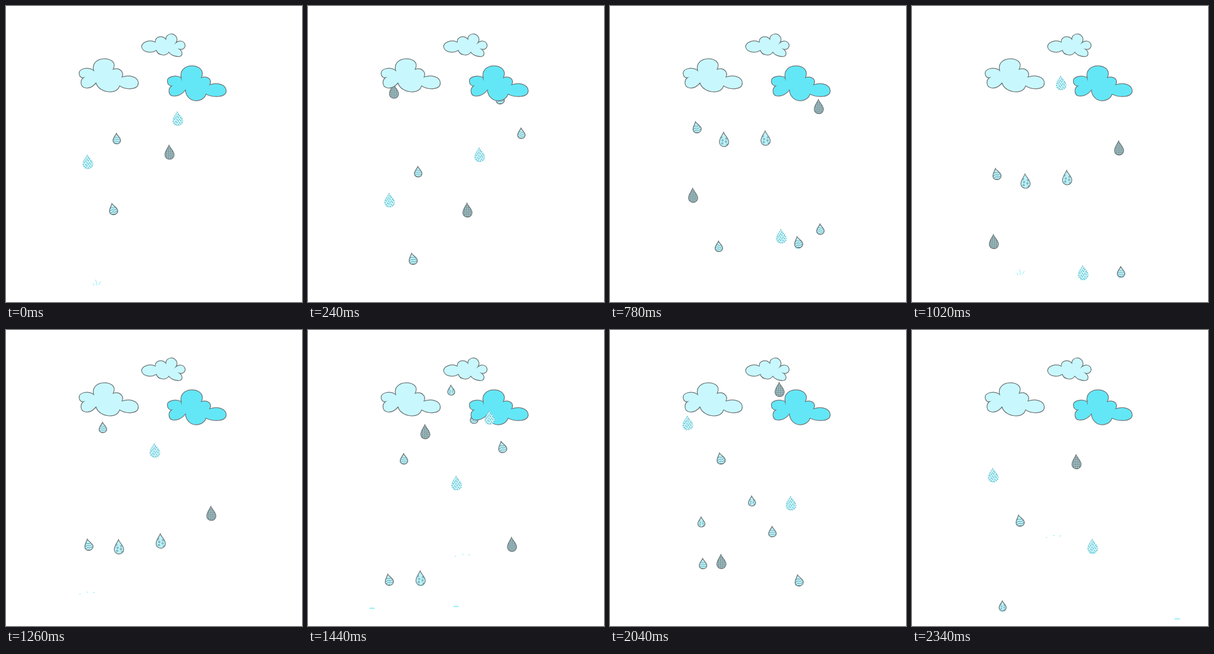
An HTML page with a canvas that plays this animation: 500x500 px, repeating every 2.4 s.

```html
<!DOCTYPE html>
<html lang="en">
<head>
<meta charset="utf-8">
<title>Rain</title>
<style>
html, body { margin: 0; width: 100%; height: 100%; overflow: hidden; background: #fff; }
canvas { display: block; width: 500px; height: 500px; }
</style>
</head>
<body>
<canvas id="sky" width="500" height="500"></canvas>
<script>
const ctx = document.getElementById('sky').getContext('2d');
const STEP = 60, STEPS = 40, TAU = Math.PI * 2;
const INK = '#6c7578', SPLASH = '#a2f1f7';

const leftCloud = new Path2D(
  'M147 108C138 102 123 106 123.5 114C124 119 127 122 131 121' +
  'C125 125 125 136 133 138C141 140 148 135 152 130' +
  'C155 140 166 145 176 145C185 145 190 141 192 135' +
  'C203 142 223.5 142 223.5 130C223 119 208 116 196 120' +
  'C200 112 192 103 181 107C187 95 177 89 166 89C153 89 145 98 148 109Z');
const rightCloud = new Path2D(
  'M296 121C287 116 272 119 272.5 127C273 132 276 135 280 135' +
  'C273 139 274 151 282 152C290 153 298 149 303 142' +
  'C304 153 312 160 321 160C330 160 336 155 338 149' +
  'C350 155 372 155 372 143C371 132 357 129 344 133' +
  'C349 125 341 117 330 121C336 108 325 101 314 101C302 101 293 109 296 122Z');
const topCloud = new Path2D(
  'M252 61C243 56 229 61 229 69C231 79 246 80 254 75' +
  'C256 83 270 86 275 78C278 83 286 85.5 292 85.5C299 85 299 77 293 73' +
  'C300 75 304 69 302 64C299 58 292 58 287 62' +
  'C292 55 286 47 279 47C273 48 270 51 270 56C264 49 252 51 252 61Z');
const tear = new Path2D('M0 -13C1.5 -7.5 8.5 -2 8.5 5A8.5 8.2 0 0 1 -8.5 5C-8.5 -2 -2.5 -7.5 0 -13Z');

const kinds = {
  grid:  { size: .91, fill: '#a9d6da', mark: grid },
  dots:  { size: .9, wide: 1.1, fill: '#c6f6fb', mark: dots, front: true },
  polka: { size: .93, fill: '#b9f1f7', mark: rings, front: true },
  mini:  { size: .64, wide: 1.1, fill: '#b9f1f7', mark: rings },
  wave:  { size: .67, wide: 1.12, fill: '#bdf4fa', mark: waves },
  tilt:  { size: .73, wide: 1.12, fill: '#bdf4fa', mark: waves, tilt: -.22 }
};

// kind, first step, x, y, landing step, x, y, splash steps (3 if left out)
const drops = [
  ['dots', 33, 130, 139, 39, 137, 245, 0],
  ['dots', 0, 138, 263, 10, 137, 425],
  ['dots', 0, 290, 190, 17, 289, 450],
  ['dots', 15, 252, 93, 31, 250, 387],
  ['dots', 23, 307, 133, 39, 305, 365, 1],
  ['grid', 33, 288, 76, 47, 264, 418],
  ['grid', 4, 145, 144, 19, 137, 437],
  ['grid', 11, 354, 135, 30, 340, 467],
  ['grid', 22, 200, 128, 36, 186, 435],
  ['polka', 6, 194, 102, 24, 190, 419],
  ['polka', 5, 264, 90, 22, 261, 373],
  ['mini', 27, 156, 126, 39, 153, 466],
  ['mini', 23, 242, 83, 37, 239, 345],
  ['wave', 0, 187, 224, 16, 183, 448],
  ['wave', 1, 362, 161, 17, 353, 449],
  ['wave', 20, 164, 147, 36, 156, 430],
  ['wave', 23, 281, 130, 36, 273, 379],
  ['tilt', 30, 191, 133, 45, 176, 448],
  ['tilt', 4, 324, 156, 13, 318, 399],
  ['tilt', 9, 150, 126, 27, 134, 481],
  ['tilt', 21, 331, 130, 36, 317, 468]
];
// step, x, y
const glints = [[24, 108, 470], [24, 250, 467], [39, 448, 488]];

function line(...points) {
  ctx.beginPath();
  for (const [x, y] of points) ctx.lineTo(x, y);
  ctx.stroke();
}

function oval(x, y, rx, ry = rx) {
  ctx.beginPath();
  ctx.ellipse(x, y, rx, ry, 0, 0, TAU);
}

function grid() {
  ctx.lineWidth = .8;
  for (let i = -8; i <= 12; i += 3.3) {
    line([i, -13], [i - .6, 14]);
    line([-9, i], [9, i + .5]);
  }
}

function waves() {
  ctx.strokeStyle = '#5a8f9e';
  ctx.lineWidth = 1.2;
  for (let y = -3; y < 13; y += 5) {
    const points = [];
    for (let x = -9; x <= 9; x++) points.push([x, y + .9 * Math.sin(x * .6)]);
    line(...points);
  }
}

function rings() {
  ctx.strokeStyle = '#52808c';
  ctx.lineWidth = .9;
  for (let i = 0; i < 6; i++) {
    oval((i % 2 ? 4.5 : -3.5) + (i % 3) - 1, -4 + i * 2.8, 1.4);
    ctx.stroke();
  }
}

function dots() {
  ctx.fillStyle = '#5fb5c5';
  for (let row = 0; row < 8; row++)
    for (let x = -9 + (row * 1.9) % 4; x < 10; x += 4.2) {
      oval(x, -11 + row * 3.2 + .6 * Math.sin(x + row), 1);
      ctx.fill();
    }
}

function drawDrop(kind, x, y) {
  const { size, wide = 1, fill, mark, tilt = -.05 } = kind;
  ctx.save();
  ctx.translate(x, y);
  ctx.rotate(tilt);
  ctx.scale(size * wide, size);
  ctx.fillStyle = fill;
  ctx.fill(tear);
  ctx.strokeStyle = INK;
  ctx.save();
  ctx.clip(tear);
  mark();
  ctx.restore();
  if (mark === dots) {
    ctx.setLineDash([1.5, 2.3]);
    ctx.strokeStyle = '#6fbfcd';
  }
  ctx.lineWidth = 1.2 / size;
  ctx.stroke(tear);
  ctx.restore();
}

function drawSplash(phase, x, y) {
  ctx.strokeStyle = ctx.fillStyle = SPLASH;
  ctx.lineWidth = 1.2;
  if (phase === 0) {
    oval(x, y + 2, 5, 1.6);
    ctx.fill();
  } else if (phase === 1) {
    line([x - 2, y - 10], [x, y - 5], [x - .5, y]);
    line([x + 7, y - 7], [x + 3, y - 1]);
    line([x - 6, y - 4], [x - 4, y]);
  } else {
    line([x - 13, y], [x - 11, y - 1.5]);
    line([x - 1, y - 4], [x + 2, y - 4]);
    line([x + 10, y - 3], [x + 13, y - 4]);
  }
}

function drawRain(step, front) {
  for (const [name, t0, x0, y0, t1, x1, y1, wet = 3] of drops) {
    const kind = kinds[name];
    if (!!kind.front !== front) continue;
    for (const t of [step, step + STEPS]) {
      const phase = t - t1;
      if (phase >= 0 && phase < wet) drawSplash(phase, x1, y1 + 13 * kind.size - 2);
      if (t < t0 || t > t1) continue;
      const k = (t - t0) / (t1 - t0);
      drawDrop(kind, x0 + (x1 - x0) * k, y0 + (y1 - y0) * k);
    }
  }
}

function drawCloud(path, fill) {
  ctx.fillStyle = fill;
  ctx.strokeStyle = INK;
  ctx.lineWidth = 1.25;
  ctx.fill(path);
  ctx.stroke(path);
}

function draw(step) {
  ctx.fillStyle = '#fff';
  ctx.fillRect(0, 0, 500, 500);
  drawRain(step, false);
  drawCloud(topCloud, '#c8f8fe');
  drawCloud(leftCloud, '#c8f8fe');
  drawCloud(rightCloud, '#63e7f6');
  drawRain(step, true);
  ctx.fillStyle = SPLASH;
  for (const [t, x, y] of glints) {
    if (t !== step) continue;
    oval(x, y, 5, 1.3);
    ctx.fill();
  }
}

const start = performance.now();
function frame() {
  const time = Math.max(0, performance.now() - start);
  draw(Math.floor(time / STEP) % STEPS);
  requestAnimationFrame(frame);
}
frame();
</script>
</body>
</html>
```
